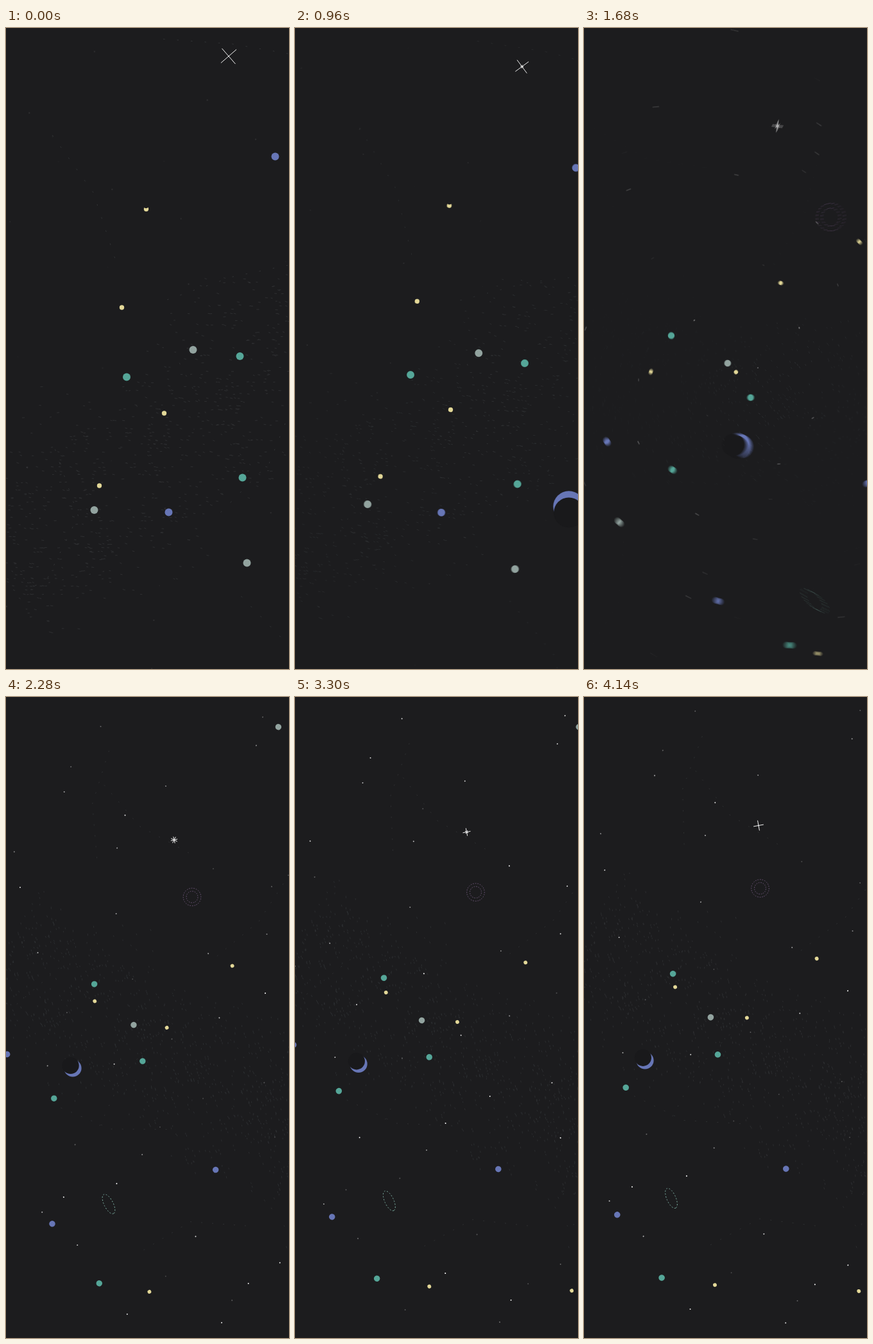
Recreate the animation shown at these times as an HTML page with a canvas. Size 441 by 1000 pixels, loop 4200 ms.

```html
<!DOCTYPE html>
<html lang="en">
<head>
<meta charset="utf-8">
<title>Turning sky</title>
<style>
  html, body { margin: 0; width: 100%; height: 100%; overflow: hidden; background: #1c1c1e; }
  canvas { display: block; width: 441px; height: 1000px; }
</style>
</head>
<body>
<canvas id="sky" width="441" height="1000"></canvas>
<script>
const W = 441, H = 1000, LOOP = 4200, STEP = 60, SHUTTER = 17, RAD = Math.PI / 180, TAU = Math.PI * 2;
const SWING = 2280, TAIL = 1860;
const BG = '#1c1c1e', TEAL = '#55a698', BLUE = '#6776b6', GREY = '#92a39f', YELLOW = '#e3d898';
const main = document.getElementById('sky').getContext('2d');
const buffer = document.createElement('canvas');
buffer.width = W;
buffer.height = H;
const ctx = buffer.getContext('2d');

const clamp = v => Math.min(1, Math.max(0, v));
const mix = (a, b, k) => a + (b - a) * k;

// Time: a hard swing first, then a slow settling glide
const early = t => clamp(t / 960);
const late = t => Math.max(0, (t - SWING) / TAIL);
function swing(t) {
  const x = clamp(t / SWING), a = x ** 2.6;
  return a / (a + 6 * (1 - x) ** 2.6);
}
const pull = t => swing(t) ** 1.6;
const roll = t => 68.4 * swing(t) + 3.1 * (1 - (1 - .877 * late(t)) ** 2);
const zoom = t => 1 - .21 * swing(t) ** 1.5 + .013 * late(t) ** 2;

let seed = 71;
const rnd = () => (seed = seed * 16807 % 2147483647) / 2147483647;
const times = (n, make) => Array.from({ length: n }, (_, i) => make(i));

// Each depth turns and shrinks about its own pivot
const NEAR = [221.8, 443.3], MID = [309.3, 546], FAR = [246, 502];
function inLayer([px, py], t, draw) {
  const s = zoom(t), v = late(t);
  ctx.save();
  ctx.translate(px + 2.5 * v, py - 11.7 * v);
  ctx.rotate(roll(t) * RAD);
  ctx.scale(s, s);
  ctx.translate(-px, -py);
  draw();
  ctx.restore();
}

const planets = [
  [TEAL, [[364.5, 512], [188, 544.5], [368.5, 701.5], [741, 753]]],
  [BLUE, [[419.5, 200.5], [253.5, 755.5], [617, 457], [597.5, 796]]],
  [GREY, [[291.5, 502], [137.5, 752], [375.5, 834.5], [-150.5, 20]]]
];
const suns = [[180.5, 436], [246.5, 601], [145.5, 714], [718.7, 825], [819, 564]];
const bitten = [218.5, 282.5];

const stars = times(90, i => {
  const a = i * 2.4 + rnd() * .8, r = 700 * Math.sqrt((i + rnd()) / 90);
  return { x: FAR[0] + r * Math.cos(a), y: FAR[1] + r * Math.sin(a), phase: rnd() * TAU };
});

const trails = times(14, i => {
  const a = i * 2.4, r = 150 + 480 * rnd();
  let x = FAR[0] + r * Math.cos(a), y = FAR[1] + r * Math.sin(a), turn = rnd() * TAU;
  return times(3, () => {
    const p = [x, y];
    turn += rnd() * 1.6 - .8;
    x += 110 * Math.cos(turn);
    y += 110 * Math.sin(turn);
    return p;
  });
});

// A slanting band of tiny dashes set in rows, with ragged edges and clumps
const dashes = times(2100, () => {
  const u = (rnd() * 2 - 1) * 440, edge = 175 + 30 * Math.sin(u / 47);
  const v = (rnd() + rnd() * .5 - .75) / .75 * edge;
  const x = 340 + .8 * u + .6 * v, y = 590 - .6 * u + .8 * v;
  const clump = .6 + .4 * Math.sin(x / 31 + y / 90) * Math.sin(y / 37 - x / 80);
  return { x, y: Math.round(y / 6) * 6 + rnd() * 2, dx: 1.3 + rnd() * .8, dy: rnd() * .9 - .2, keep: rnd() < clump };
}).filter(d => d.keep);

// Single bodies: path of the swing, small moves before and after it, size range
const body = (from, to, before, after, big, small) => ({
  at: t => [0, 1].map(i =>
    mix(from[i], to[i], pull(t)) + before[i] * (early(t) - 1) + after[i] * late(t)),
  r: t => mix(big, small, pull(t))
});
const moon = body([431, 749], [104, 579], [-46, 30], [-9, -12], 24.5, 13.6);
const spark = body([355, 58], [262, 223], [8, 14], [10, -22.5], 13, 5.3);
const ring = body([513, 272], [290, 312], [0, 0], [-15.5, -13.5], 32, 13.8);
const oval = body([630, 1033], [160, 791], [0, 0], [-24, -9], 30, 16.7);

function disc(x, y, r, fill) {
  ctx.fillStyle = fill;
  ctx.beginPath();
  ctx.arc(x, y, r, 0, TAU);
  ctx.fill();
}

function dashedEllipse([x, y], rx, ry, tilt, color, count) {
  const unit = Math.PI * (rx + ry) / count;
  ctx.strokeStyle = color;
  ctx.lineWidth = 1;
  ctx.setLineDash([unit * .45, unit * .55]);
  ctx.beginPath();
  ctx.ellipse(x, y, rx, ry, tilt * RAD, 0, TAU);
  ctx.stroke();
  ctx.setLineDash([]);
}

function cross([x, y], r, angle) {
  ctx.beginPath();
  for (const a of [angle, angle + 90]) {
    const dx = r * Math.cos(a * RAD), dy = r * Math.sin(a * RAD);
    ctx.moveTo(x - dx, y - dy);
    ctx.lineTo(x + dx, y + dy);
  }
  ctx.stroke();
}

function drawField() {
  ctx.strokeStyle = '#303234';
  ctx.lineWidth = .9;
  ctx.beginPath();
  for (const d of dashes) {
    ctx.moveTo(d.x - d.dx, d.y - d.dy);
    ctx.lineTo(d.x + d.dx, d.y + d.dy);
  }
  ctx.stroke();
}

function drawStars(t) {
  ctx.strokeStyle = '#313335';
  ctx.setLineDash([2.5, 19]);
  ctx.lineWidth = 1;
  for (const line of trails) {
    ctx.beginPath();
    line.forEach(p => ctx.lineTo(...p));
    ctx.stroke();
  }
  ctx.setLineDash([]);
  const fade = mix(.08, 1, clamp((t - 1000) / 1100));
  for (const s of stars) {
    ctx.globalAlpha = fade * (.6 + .4 * Math.sin(t / 300 + s.phase));
    disc(s.x, s.y, 1.25, '#fff');
  }
}

function drawSuns(t) {
  for (const p of suns) disc(...p, 3.7, YELLOW);
  const [x, y] = bitten;
  disc(x, y, 3.7, YELLOW);
  disc(x - .3, y - 4.6 - 4 * swing(t), 3.3, BG);
}

function drawPlanets() {
  for (const [color, pts] of planets) for (const p of pts) disc(...p, 6, color);
}

function drawMoon(t) {
  const [x, y] = moon.at(t), r = moon.r(t);
  const a = (mix(-92, 50, pull(t)) + 3.5 * late(t)) * RAD;
  disc(x, y, r, BLUE);
  disc(x - Math.cos(a) * r * .38, y - Math.sin(a) * r * .38, r * .96, '#19191b');
}

// Two crosses trade length as it twinkles
function drawSpark(t) {
  const p = spark.at(t), a = 49 + roll(t), e = early(t), v = late(t);
  ctx.strokeStyle = '#f4f4f4';
  ctx.lineWidth = 1;
  cross(p, spark.r(t) + 3 * (1 - e) - 4.4 * v, a);
  cross(p, 2.5 * e + 2.8 * pull(t) + 2.7 * v * v, a - 41);
}

function scene(t) {
  ctx.fillStyle = BG;
  ctx.fillRect(0, 0, W, H);
  inLayer(MID, t, drawField);
  inLayer(FAR, t, () => drawStars(t));
  const r = ring.r(t), o = oval.r(t), tilt = roll(t);
  dashedEllipse(ring.at(t), r, r, tilt, '#70587c', 24);
  dashedEllipse(ring.at(t), r * .65, r * .65, tilt, '#70587c', 16);
  dashedEllipse(oval.at(t), o, o * .42, tilt - 5.5, '#7fb3a6', 16);
  drawMoon(t);
  inLayer(MID, t, () => drawSuns(t));
  inLayer(NEAR, t, drawPlanets);
  drawSpark(t);
}

// Fast turning is averaged over the shutter time
function render(t) {
  const speed = (roll(t + 5) - roll(t - 5)) / 10;
  const n = speed > .012 ? 10 : 1;
  for (let i = 0; i < n; i++) {
    scene(t + ((i + .5) / n - .5) * SHUTTER);
    main.globalAlpha = 1 / (i + 1);
    main.drawImage(buffer, 0, 0);
  }
}

let shown = -1;
const start = performance.now();
function tick() {
  const t = Math.floor((performance.now() - start) % LOOP / STEP) * STEP;
  if (t !== shown) render(shown = t);
  requestAnimationFrame(tick);
}
tick();
</script>
</body>
</html>
```
